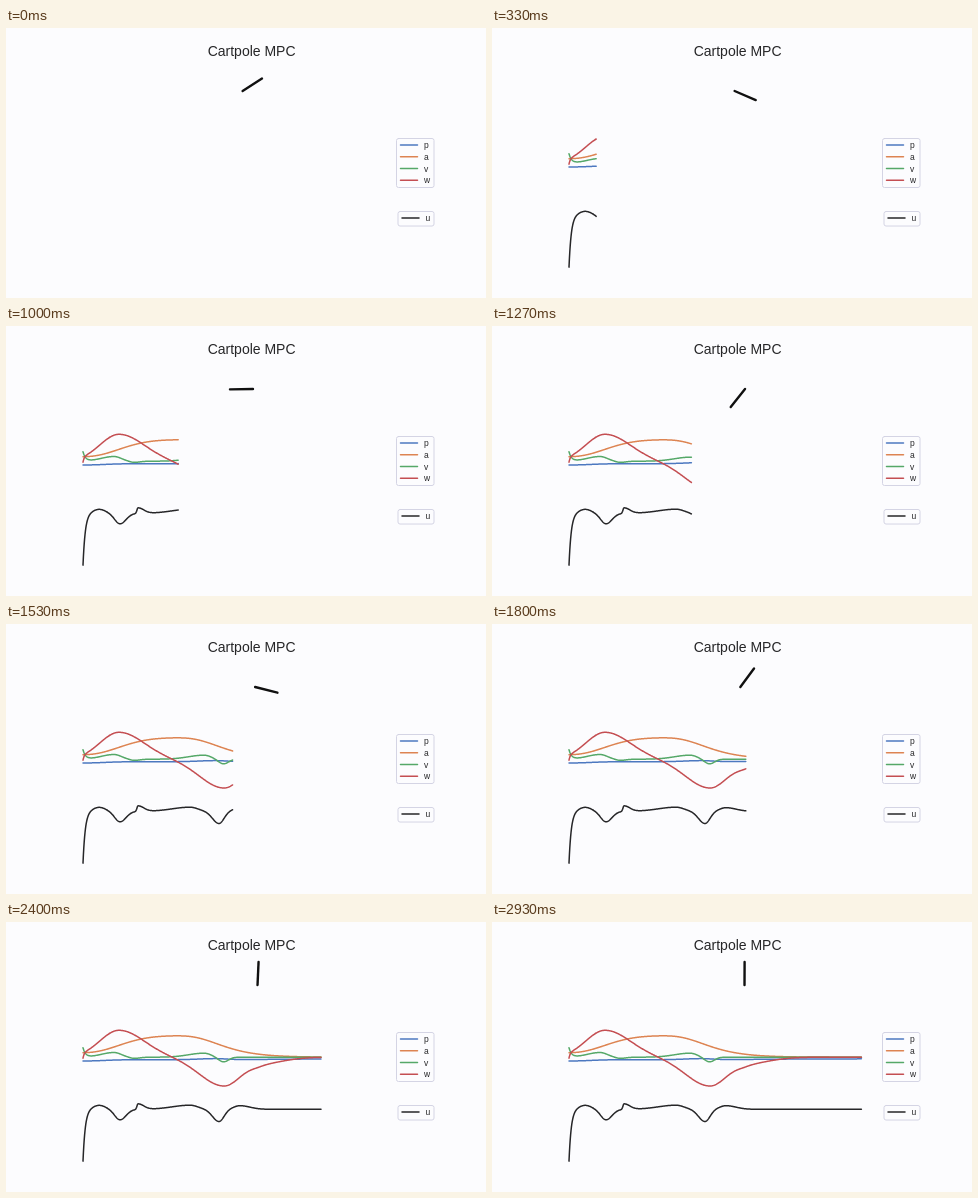
Write an HTML page with a canvas that moves like this. It is 480 px wide and 270 px high and loops after 2990 ms.

```html
<!DOCTYPE html>
<html lang="en">
<head>
<meta charset="utf-8">
<title>Cartpole MPC</title>
<style>
  html, body { margin: 0; width: 100%; height: 100%; overflow: hidden; background: #fcfcfe; }
  canvas { display: block; width: 480px; height: 270px; }
</style>
</head>
<body>
<canvas id="stage" width="480" height="270"></canvas>
<script>
const ctx = document.getElementById('stage').getContext('2d');
const LOOP = 2990, STEPS = 45;
const X0 = 77, DX = 6.8, ZERO = 135.2, REST = 187.3;
const PAPER = '#fcfcfe', INK = '#262628', POLE = '#101010', FRAME = '#d4d4e4';
const BLUE = '#4c78c0', ORANGE = '#dd8452', GREEN = '#55a868', RED = '#c44e52';
const FONT = '"Liberation Sans", Arial, sans-serif';

const { exp, sin, cos, pow, max, round } = Math;

// Bell of the given height with separate left and right widths.
const hump = (x, mid, left, right, height) =>
  height * exp(-pow((x - mid) / (x < mid ? left : right), 2));
const rise = (x, mid, width) => 1 / (1 + exp((mid - x) / width));
const fade = (x, width) => exp((X0 - x) / width);
const stepAt = x => 1 + (x - X0) / DX;

// Pole angle in radians from upright: swings up one way, then settles.
const angle = s =>
  4.75 * (1 - exp(-exp((20.6 - s) / 3.3))) - 3.75 * exp(-pow((s - 1) / 6.9, 2.2));

const cart = s =>
  236 + 10.3 * rise(s, 4.3, 1.2) + hump(s, 20.4, 3.3, 2.2, 7.6) + 6.4 * rise(s, 30, 4);

const position = x => 139.1 - (cart(stepAt(x)) - 236) * 0.135;
const tilt = x => ZERO - 4.55 * angle(stepAt(x));

const speed = x => ZERO
  - 9.2 * fade(x, 2.5)
  - hump(x, 108, 18, 10, 4.7)
  + hump(x, 128, 6, 8, 1.2)
  - hump(x, 198, 22, 10, 4)
  + hump(x, 217.5, 7, 7, 4.7);

const spin = x => ZERO
  + 5.5 * fade(x, 1.2)
  - hump(x, 113, 27, 35.5, 26.9)
  + hump(x, 218, 34, 25, 28.8)
  + hump(x, 255, 15, 32, 6);

const force = x => REST
  + 52 * fade(x, 2.3)
  - hump(x, 93, 9, 9, 4)
  + hump(x, 114, 7.5, 8.5, 10.5)
  - hump(x, 132, 1.5, 8, 5.5)
  - hump(x, 184, 25, 11, 4.1)
  + hump(x, 213, 9, 7, 12.2)
  - hump(x, 234, 9, 14, 3.6);

function line(x1, y1, x2, y2, color, width) {
  ctx.strokeStyle = color;
  ctx.lineWidth = width;
  ctx.beginPath();
  ctx.moveTo(x1, y1);
  ctx.lineTo(x2, y2);
  ctx.stroke();
}

function curve(fn, end, color) {
  ctx.strokeStyle = color;
  ctx.lineWidth = 1.5;
  ctx.beginPath();
  ctx.moveTo(X0, fn(X0));
  for (let x = X0 + 0.4; x < end; x += 0.4) ctx.lineTo(x, fn(x));
  ctx.lineTo(end, fn(end));
  ctx.stroke();
}

function text(str, x, y, size, align) {
  ctx.font = size + 'px ' + FONT;
  ctx.textAlign = align;
  ctx.fillStyle = INK;
  ctx.fillText(str, x, y);
}

function legend(x, y, w, h, rows) {
  ctx.strokeStyle = FRAME;
  ctx.lineWidth = 1;
  ctx.beginPath();
  ctx.roundRect(x, y, w, h, 2);
  ctx.stroke();
  rows.forEach(([name, color], i) => {
    const ry = y + 6.6 + i * 11.75;
    line(x + 4, ry, x + 21, ry, color, 1.5);
    text(name, x + 27.5, ry + 2.9, 8.5, 'left');
  });
}

function draw(step) {
  ctx.fillStyle = PAPER;
  ctx.fillRect(0, 0, 480, 270);
  ctx.lineCap = ctx.lineJoin = 'round';
  text('Cartpole MPC', 245.6, 28, 14, 'center');

  const s = max(1, step), px = cart(s), a = angle(s), len = 23;
  line(px, 63, px + len * sin(a), 63 - len * cos(a), POLE, 2.4);

  if (step > 1) {
    const end = X0 + (step - 1) * DX;
    curve(position, end, BLUE);
    curve(tilt, end, ORANGE);
    curve(speed, end, GREEN);
    curve(spin, end, RED);
    curve(force, end, INK);
  }
  legend(390.5, 110.5, 37.5, 49, [['p', BLUE], ['a', ORANGE], ['v', GREEN], ['w', RED]]);
  legend(392, 183.5, 36, 14.5, [['u', INK]]);
}

// Steps last 1/15 s, rounded to hundredths.
function tick() {
  const t = performance.now() % LOOP;
  let step = STEPS - 1;
  while (step > 0 && round(step * 20 / 3) * 10 > t) step--;
  draw(step);
  requestAnimationFrame(tick);
}
tick();
</script>
</body>
</html>
```
